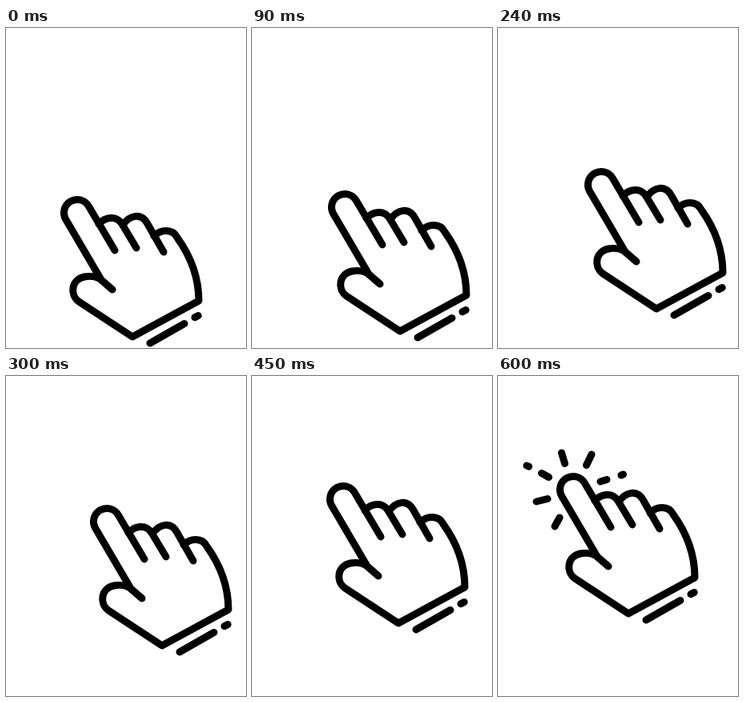
Animation of 300x400 px, one loop 1500 ms. Source, as an HTML page:

```html
<!DOCTYPE html>
<html lang="en">
<head>
<meta charset="utf-8">
<title>Click</title>
<style>
  html, body { margin: 0; width: 100%; height: 100%; overflow: hidden; background: #fff; }
  svg { display: block; width: 100vw; height: 100vh; }
  path { fill: none; stroke: #000; stroke-width: 9; stroke-linecap: round; stroke-linejoin: round; }
  #rays { visibility: hidden; }
</style>
</head>
<body>
<svg viewBox="0 0 300 400">
  <g id="hand">
    <!-- index finger and thumb -->
    <path d="M136 278 L103.3 222.7 A16.5 16.5 0 0 0 74.7 239.2 L118 313"/>
    <path d="M133 327 L118 314 C112 310 103 310 98 311 C82 314 79 333 91 342 L158 386 L241 341
             C241 314 232 287 214 262 C208 250 193 252 185 260"/>
    <!-- folded fingers -->
    <path d="M116 245 C124 236 138 234 145 245 L163 275"/>
    <path d="M146 246 C155 234 169 230 177 245 L197 280"/>
    <!-- cuff -->
    <path d="M180 394 L223 369.5 M236 361.8 L240.3 359.5"/>
  </g>
  <path id="rays" d="M79.5 96 L83.5 109.5 M117 98 L110.5 111.5 M128 132 L136 129.5 M154 124 L156.5 123
    M54.5 121.5 L63.5 126.5 M35.8 112 L38.5 113.2 M48 157 L62 153.5 M77 177 L71 188"/>
</svg>
<script>
  const LOOP = 1500, STEP = 30, END = 600, CLICK = 570;
  const hand = document.getElementById('hand');
  const rays = document.getElementById('rays');

  // Path knots: [time, x, y]
  const knots = [
    [0, 0, 0], [90, 27, -7], [150, 35, -17], [240, 40, -35],
    [360, 33, -62], [450, 25, -77], [540, 11, -87], [END, 5, -89]
  ];
  const startSlope = [0, 0.385, -0.035], endSlope = [0, -0.08, -0.015];

  function slope(i, axis) {
    if (i === 0) return startSlope[axis];
    if (i === knots.length - 1) return endSlope[axis];
    const a = knots[i - 1], b = knots[i + 1];
    return (b[axis] - a[axis]) / (b[0] - a[0]);
  }

  // Cubic Hermite interpolation between neighbouring knots
  function place(t, axis) {
    let i = 0;
    while (i < knots.length - 2 && t >= knots[i + 1][0]) i++;
    const a = knots[i], b = knots[i + 1];
    const h = b[0] - a[0], u = (t - a[0]) / h, v = 1 - u;
    return a[axis] * v * v * (1 + 2 * u) + b[axis] * u * u * (3 - 2 * u)
      + h * u * v * (slope(i, axis) * v - slope(i + 1, axis) * u);
  }

  function draw(time) {
    const t = Math.min(Math.floor((time % LOOP) / STEP) * STEP, END);
    const x = Math.round(place(t, 1)), y = Math.round(place(t, 2));
    hand.setAttribute('transform', `translate(${x} ${y})`);
    rays.style.visibility = t >= CLICK ? 'visible' : 'hidden';
  }

  const start = performance.now();
  function tick() {
    draw(performance.now() - start);
    requestAnimationFrame(tick);
  }
  tick();
</script>
</body>
</html>
```
